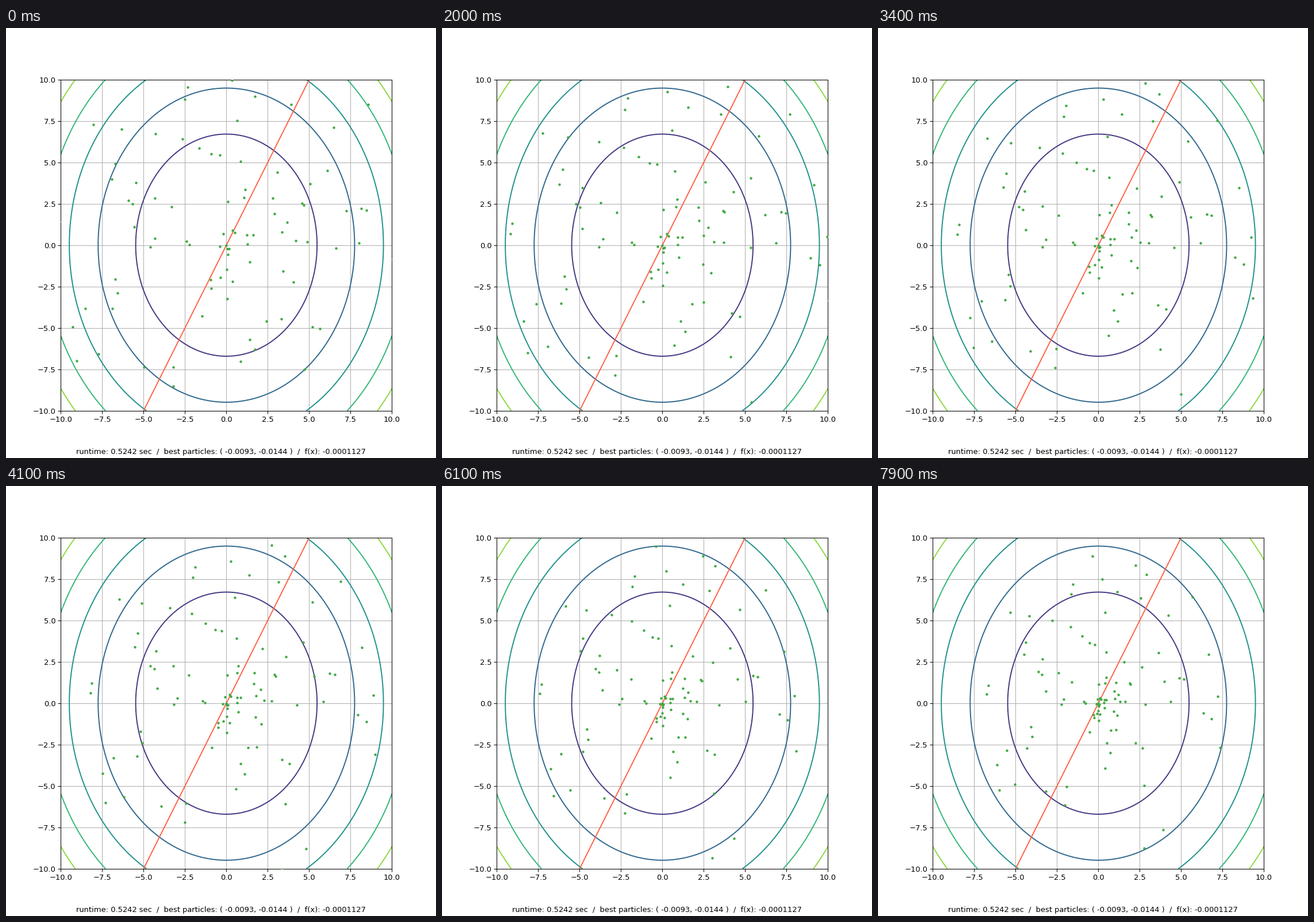
These frames come from a looping animation (748 by 748 pixels, 8000 ms). A matplotlib script:

```python
import numpy as np
import matplotlib.pyplot as plt
from matplotlib.animation import FuncAnimation

FRAMES, STEP = 80, 100
COUNT = 98
MID = 3.4  # seconds at which the swarm has its base spread

rng = np.random.default_rng(12)


def spread(n):
    """Even in radius, so the swarm is densest at the centre."""
    r = 11 * ((np.arange(n) + rng.random(n)) / n) ** 1.1
    a = rng.uniform(0, 2 * np.pi, n)
    return np.column_stack([.92 * r * np.cos(a), r * np.sin(a)])


def decay_rates(p):
    """Gradient pull on each axis plus a stronger pull near the core."""
    d2 = ((p - (1, -1)) ** 2).sum(axis=1, keepdims=True)
    return np.array([.052, .0355]) + .12 * np.exp(-d2 / 4.2 ** 2)


base = spread(COUNT)
rates = decay_rates(base)


def swarm(t):
    return base * np.exp(-rates * (t - MID))


plt.rcParams["font.family"] = "DejaVu Sans"
fig, ax = plt.subplots(figsize=(8, 8), dpi=93.5)
ax.set_aspect("equal")
ax.set(xlim=(-10, 10), ylim=(-10, 10))
ticks = np.arange(-10, 10.1, 2.5)
ax.set_xticks(ticks)
ax.set_yticks(ticks)
ax.grid(True)

g = np.linspace(-10, 10, 201)
X, Y = np.meshgrid(g, g)
ax.contour(X, Y, X ** 2 / 2 + Y ** 2 / 3, levels=np.arange(0, 91, 15),
           cmap="viridis", vmin=0, vmax=90, linewidths=1.5)
ax.plot([-5, 5], [-10, 10], color="tomato", lw=1.5)
dots, = ax.plot([], [], "o", color="#41a941", ms=2.4, mew=1, zorder=3)
fig.text(.5, .01, "runtime: 0.5242 sec  /  best particles: "
         "( -0.0093, -0.0144 )  /  f(x): -0.0001127", ha="center")


def update(frame):
    dots.set_data(*swarm(frame * STEP / 1000).T)
    return dots,


anim = FuncAnimation(fig, update, frames=FRAMES, interval=STEP,
                     repeat=True, repeat_delay=0, blit=False)
plt.show()
```
